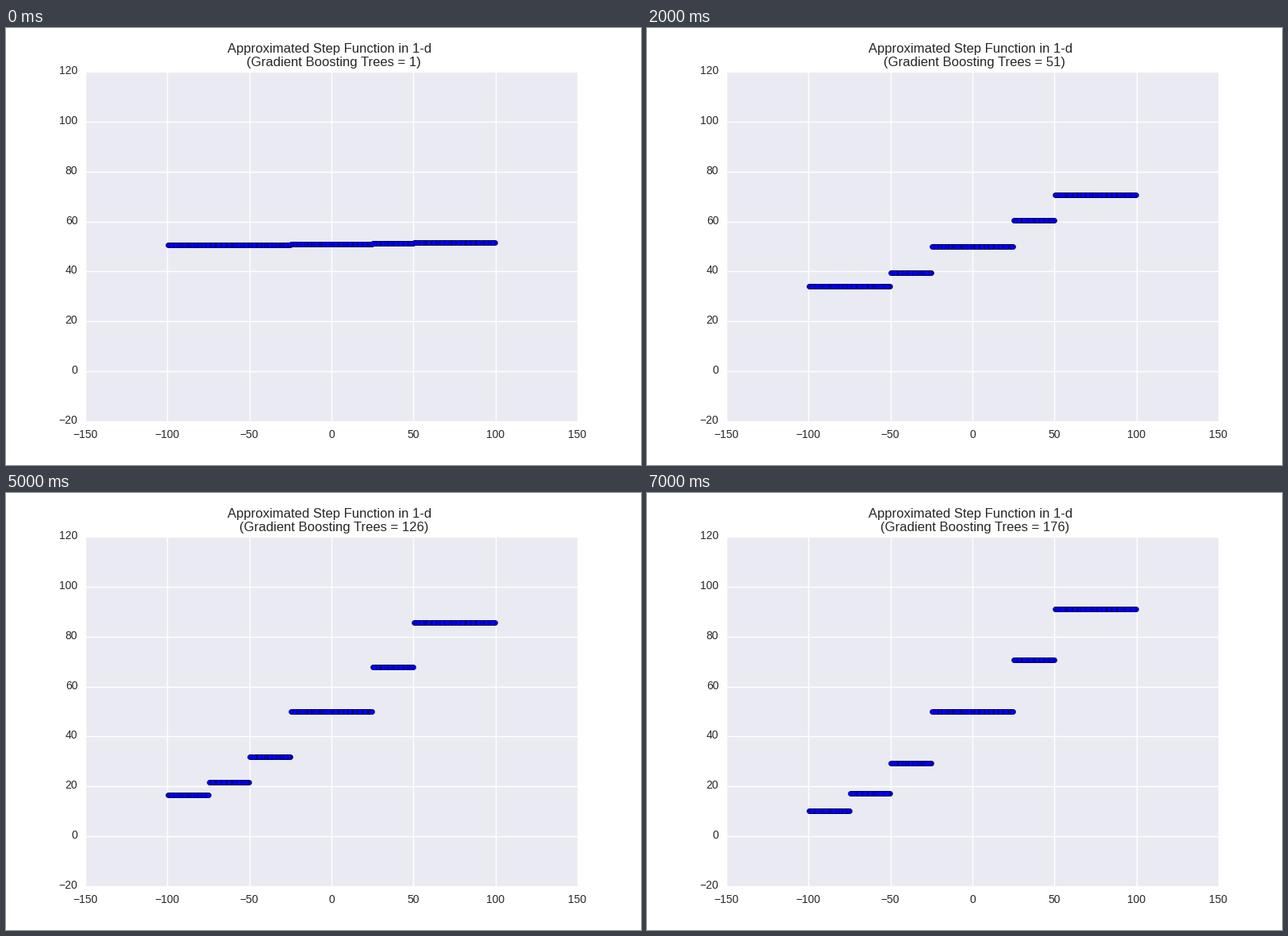
These frames come from a looping animation (800x550 px, 8 s). A matplotlib script:

```python
import matplotlib.pyplot as plt
import numpy as np
from matplotlib.animation import FuncAnimation

W, H, DPI = 800, 550, 100
INK = "#262626"
plt.rcParams["font.family"] = "Liberation Sans"

# The step function to be learned, and the boosting settings
EDGES = [-75, -50, -25, 25, 50]
GOAL = np.array([0, 10, 25, 50, 75, 100])
WIDTH = np.diff([-100, *EDGES, 100])
START, RATE, DEPTH = 51.05, 0.01, 2
FRAMES, TREES_PER_FRAME = 8, 25


def fit_tree(res, lo, hi, depth):
    """Greedy regression tree over steps lo..hi; one value per step."""
    if depth == 0 or hi - lo == 1:
        mean = np.average(res[lo:hi], weights=WIDTH[lo:hi])
        return np.full(hi - lo, mean)

    def score(a, b):
        return (res[a:b] @ WIDTH[a:b]) ** 2 / WIDTH[a:b].sum()

    cut = max(range(lo + 1, hi), key=lambda k: score(lo, k) + score(k, hi))
    return np.concatenate([fit_tree(res, lo, cut, depth - 1),
                           fit_tree(res, cut, hi, depth - 1)])


def levels(trees):
    fitted = np.full(len(GOAL), START)
    for _ in range(trees):
        fitted = fitted + RATE * fit_tree(GOAL - fitted, 0, len(GOAL), DEPTH)
    return fitted


def label(x, y, text, size, ha):
    """Text with its baseline at pixel (x, y) from the top left."""
    return fig.text(x / W, 1 - y / H, text, size=size, color=INK,
                    ha=ha, va="baseline")


def tick_text(v):
    return str(v).replace("-", "\u2212")


fig = plt.figure(figsize=(W / DPI, H / DPI), dpi=DPI, facecolor="white")
ax = fig.add_axes([0.125, 0.1, 0.775, 0.8], facecolor="#EAEAF2")
ax.set(xlim=(-150, 150), ylim=(-20, 120),
       xticks=range(-150, 151, 50), yticks=range(-20, 121, 20))
ax.set_axisbelow(True)
ax.grid(color="white", linewidth=1, linestyle="-")
ax.tick_params(length=0, labelbottom=False, labelleft=False)
for spine in ax.spines.values():
    spine.set_visible(False)

for v in range(-150, 151, 50):
    label(100 + (v + 150) * 620 / 300, 516, tick_text(v), 10, "center")
for v in range(-20, 121, 20):
    label(90.3, 498 - (v + 20) * 440 / 140, tick_text(v), 10, "right")

label(408, 31, "Approximated Step Function in 1-d", 12, "center")
subtitle = label(413, 48, "", 12, "center")

# Dots are stacked in random order
rng = np.random.default_rng(4)
xs = rng.permutation(np.linspace(-99.6, 99.7, 400))
step = np.digitize(xs, EDGES)
dots = ax.scatter(xs, np.zeros_like(xs), s=20, c="#0000ff",
                  edgecolors="black", linewidths=0.3, zorder=3)


def draw(i):
    trees = 1 + TREES_PER_FRAME * i
    dots.set_offsets(np.column_stack([xs, levels(trees)[step]]))
    subtitle.set_text(f"(Gradient Boosting Trees = {trees})")
    return dots, subtitle


anim = FuncAnimation(fig, draw, frames=FRAMES, interval=1000, repeat=True,
                     repeat_delay=0)
plt.show()
```
